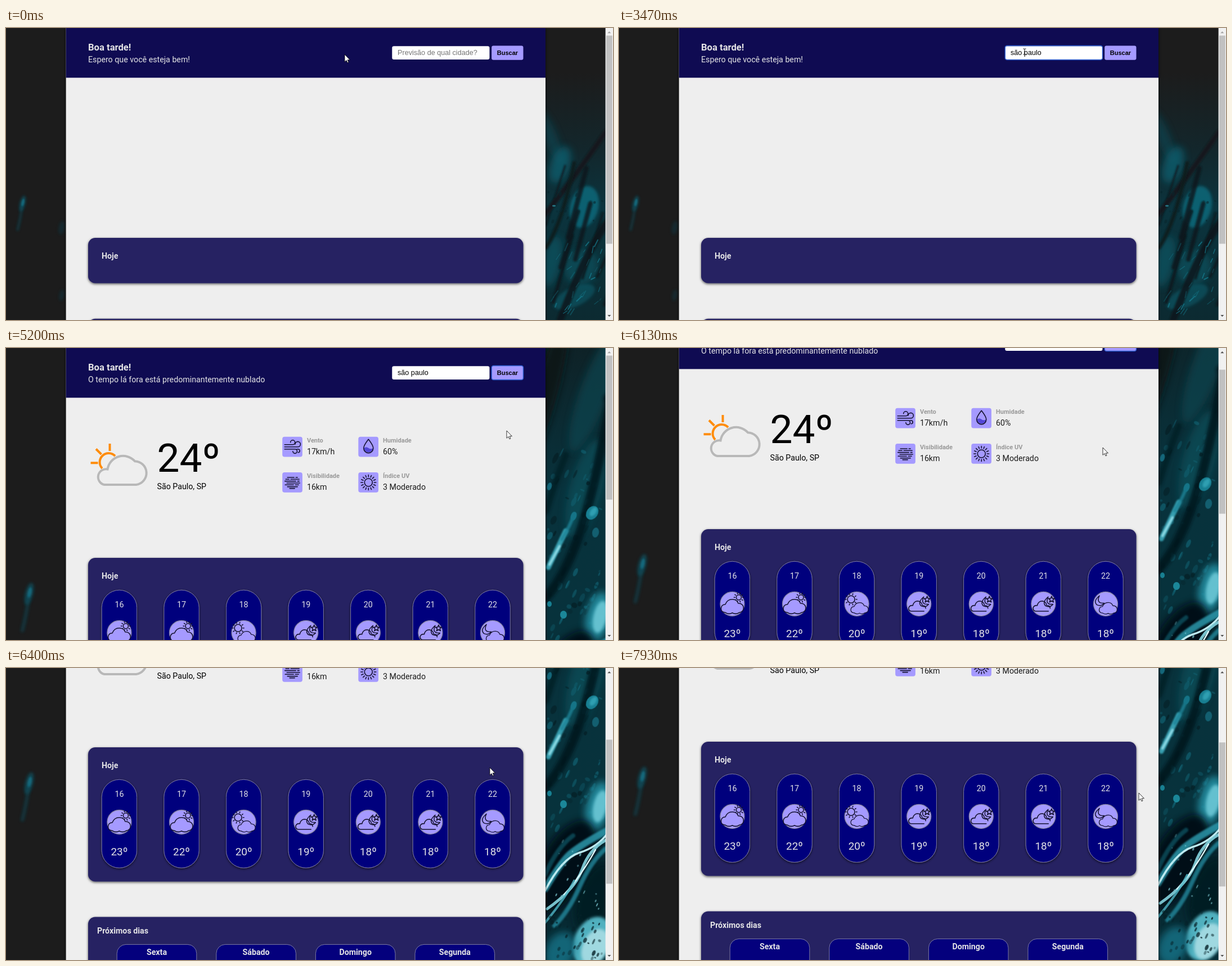
Animation of 1079x519 px, one loop 8000 ms. Source, as an HTML page:

```html
<!DOCTYPE html>
<html lang="pt-BR">
<head>
<meta charset="utf-8">
<title>Previsão do tempo</title>
<style>
html, body { margin: 0; width: 100%; height: 100%; overflow: hidden; background: #1c1c1c; }
svg { display: block; }
text { font-family: Roboto, sans-serif; font-size: 14.22px; white-space: pre; }
.b { font-weight: 700; }
.m { text-anchor: middle; }
.w { fill: #e4e4e6; }
.ui { font-family: "Liberation Sans", Arial, sans-serif; font-size: 12.64px; }
.cap { font-size: 11.06px; font-weight: 700; fill: #999; }
.ink { fill: none; stroke: #14122e; stroke-width: 1.6; stroke-linecap: round; stroke-linejoin: round; }
.card { fill: #252262; filter: url(#shade); }
.pill { fill: #04007d; stroke: #9694b4; stroke-width: .8; }
</style>
</head>
<body>
<svg id="stage" width="1079" height="519" viewBox="0 0 1079 519"></svg>
<script>
const STEP = 1000 / 15, LOOP = 8000;
const LILAC = '#a59aff';

let seed = 11;
const rnd = (a, b) => {
  seed = (seed * 16807) % 2147483647;
  return a + (b - a) * seed / 2147483647;
};
const times = (n, f) => Array.from({ length: n }, (_, i) => f(i)).join('');
const text = (x, y, s, cls = '', extra = '') => `<text x="${x}" y="${y}" class="${cls}" ${extra}>${s}</text>`;
const rect = (x, y, w, h, r, extra) => `<rect x="${x}" y="${y}" width="${w}" height="${h}" rx="${r}" ${extra}/>`;
const path = (d, extra = '') => `<path d="${d}" ${extra}/>`;
const at = (x, y, s, k = 1) => `<g transform="translate(${x} ${y}) scale(${k})">${s}</g>`;
const blob = (x, y, rx, ry, rot, fill, op = 1, blur = 1) =>
  `<ellipse rx="${rx}" ry="${ry}" transform="translate(${x} ${y}) rotate(${rot})" fill="${fill}" opacity="${op}" filter="url(#blur${blur})"/>`;
const line = (d, color, w, op = 1, blur = 1) =>
  path(d, `fill="none" stroke="${color}" stroke-width="${w}" stroke-linecap="round" opacity="${op}" filter="url(#blur${blur})"`);
const rays = (n, r1, r2) => times(n, i => {
  const a = i * 2 * Math.PI / n, c = Math.cos(a), s = Math.sin(a);
  return `M${c * r1} ${s * r1}L${c * r2} ${s * r2}`;
});

// Backdrop: soft tones of a dark teal photo
const feather = blob(41, 437, 7, 20, 14, '#0b5364', .7, 4) + blob(42, 435, 3.5, 10, 12, '#177287', .8, 2) +
  line('M40 445Q36 475 29 502', '#0b4654', 6, .6, 4);
const scatter = (n, y1, y2, size, color, op) => times(n, () =>
  blob(rnd(962, 1064), rnd(y1, y2), rnd(1, size), rnd(1, size * 1.8), 25, color, rnd(op / 3, op), 1));

const photoEmpty = at(0, 0, feather, .714) +
  blob(99, 355, 5, 12, 10, '#0a3944', .5, 4) + blob(99, 475, 4, 10, 10, '#0a3944', .5, 4) +
  '<g clip-path="url(#strip)">' +
  rect(959, 80, 107, 439, 0, 'fill="url(#emptyTone)"') +
  blob(968, 195, 12, 50, -22, '#0a4653', .65, 9) +
  blob(985, 243, 17, 34, 20, '#0c6071', .75, 9) +
  blob(1028, 318, 25, 38, 15, '#0d6c7e', .8, 4) +
  blob(970, 415, 17, 46, 12, '#0a5361', .75, 9) +
  blob(1022, 425, 30, 32, 30, '#0a5562', .65, 9) +
  blob(1010, 478, 40, 17, -25, '#0b5b6a', .6, 4) +
  times(9, i => line(`M${960 + i * 13} ${rnd(350, 510)}l${rnd(25, 45)} -${rnd(85, 150)}`, '#0c181b', rnd(3, 10), .8, 2)) +
  line('M955 335Q1000 280 1066 185', '#14191b', 9, .9, 2) +
  line('M960 390Q990 345 1010 240', '#101b1e', 7, .9, 2) +
  line('M1066 350Q1030 400 985 519', '#0f191b', 13, .85, 2) +
  scatter(22, 290, 345, 2.4, '#08272e', .9) +
  times(34, () => {
    const x = rnd(962, 1062), y = rnd(385, 512);
    return line(`M${x} ${y}l${rnd(2, 9)} -${rnd(3, 13)}`, '#157b8d', rnd(.8, 2.3), rnd(.3, .8));
  }) +
  blob(974, 316, 3, 1.5, 0, '#2a8c9e', .8) + '</g>';

const photoFull = feather + '<g clip-path="url(#strip)">' +
  rect(959, 0, 107, 1000, 0, 'fill="url(#fullTone)"') +
  blob(1045, 80, 25, 110, 20, '#0b4550', .7, 9) +
  blob(960, 80, 20, 130, 15, '#0d1619', .9, 9) +
  blob(1030, 250, 28, 90, 15, '#0b5461', .6, 9) +
  scatter(50, 180, 520, 5, '#147184', .55) +
  scatter(26, 150, 560, 6, '#04171c', .6) +
  line('M958 445Q1010 390 1045 240T1070 90', '#04181d', 17, .85, 4) +
  line('M960 290Q975 240 995 190', '#051a20', 12, .7, 4) +
  line('M964 390Q976 365 995 325', '#43b9cc', 9, .8, 2) +
  line('M966 385L984 352', '#9de4ee', 4, .9, 2) +
  line('M988 340Q1002 318 1010 295', '#1a8296', 6, .8, 2) +
  blob(1042, 293, 10, 13, 35, '#187f92', 1, 1) + blob(1044, 291, 5, 9, 35, '#34a7ba', .8, 2) +
  blob(1009, 299, 5, 8, 20, '#157487') + blob(1048, 328, 6, 9, 10, '#135f70') +
  blob(966, 246, 4, 7, 15, '#14677a') + blob(991, 474, 6, 7, 0, '#1b8799') + blob(966, 455, 4, 5, 0, '#178092') +
  blob(1052, 478, 21, 45, 12, '#2596aa', .85, 9) + blob(1056, 478, 12, 29, 12, '#6fcbd9', .85, 4) +
  blob(992, 585, 42, 90, 28, '#031117', .95, 9) +
  blob(1048, 640, 32, 65, 20, '#041a20', .9, 9) +
  line('M958 625Q985 580 1000 565T1070 520', '#2d9fb3', 12, .8, 2) +
  line('M958 628Q988 570 1020 560T1070 525', '#bdeaf0', 3.5) +
  line('M1066 538Q1036 555 1024 590T962 660', '#85d4df', 5, .9) +
  line('M1066 553Q1040 575 1020 620T975 690', '#20879b', 8, .8, 2) +
  line('M1048 555Q1020 605 992 635', '#e0f8fa', 2.5) +
  line('M958 685Q995 640 1010 610', '#4fb5c5', 4, .8) +
  line('M958 600Q980 550 1008 530', '#0d5968', 8, .7, 2) +
  blob(1042, 718, 32, 46, 25, '#55b8c7', .95, 4) + blob(1047, 728, 22, 34, 25, '#addfe6', .85, 4) +
  blob(985, 735, 25, 35, 25, '#167388', .8, 9) +
  scatter(45, 665, 775, 3, '#062128', .95) +
  scatter(18, 540, 660, 2, '#8bdae4', .8) + '</g>';

// Icons
const wind = path('M4 14H18.5a4 4 0 1 0-4-4M4 18H27.5a4.7 4.7 0 1 0-4.7-4.7M4 22H22.5a3.8 3.8 0 1 1-3.8 3.8M26 22h2a3 3 0 0 1 0 6');
const drop = path('M10 20Q14 17 18 20T26.5 20A8.5 8.5 0 0 1 9.6 20Z', 'fill="#5347d6" stroke="none"') +
  path('M18 4.5C22 10 26.5 15 26.5 20.3a8.5 8.5 0 0 1-17 0C9.5 15 14 10 18 4.5Z');
const haze = path('M9 9H21M24 9h3M6 12.3H12M15 12.3H30M4.500 15.600H24M27 15.600h3M8 19H31M5 22.300H20M23 22.300h6M9 25.600H27M13 28.600H22');
const uv = '<circle cx="18" cy="18" r="7"/>' + at(18, 18, path(rays(16, 10, 13.5)));

const puff = path('M-12 15.500Q-20 15-20 8Q-19 1-12.500 1Q-9-8 0-8Q8-8 10.500-1Q19-1 20 7Q20 14.500 12 15.500Q6 19.500 0 16Q-6 19.500-12 15.500Z', `fill="${LILAC}"`);
const flat = path('M-14 13H9M-14 13Q-19 12-18 6.500Q-16 2-11 3Q-9-5-2-5Q5-4 6 3Q12 3 12 8');
const sun = r => `<circle r="${r}"/>` + path(rays(10, r + 2.2, r + 4));
const moon = path('M-1-9Q-8 6 8 5Q2 12-6 8Q-13 1-1-9Z');
const star = path('M0-5.500L1.500-1.700 5.500-1.500 2.300 1 3.500 5 0 2.700-3.500 5-2.300 1-5.500-1.500-1.500-1.700Z');
const sky = {
  cloud: at(11.5, -11.5, sun(4.5)) + puff,
  sunny: at(-10, -8, sun(6.5)) + at(5, 4, puff, .78),
  night: at(9.5, -4, moon, .95) + flat + at(14.5, -8, star),
  moon: at(-10, -6, moon, .95) + at(4.5, 4, puff, .8),
};

// Page parts
const tile = (x, y, icon, label, value) =>
  rect(x, y, 35.7, 35.7, 4, `fill="${LILAC}"`) + `<g class="ink">${at(x, y, icon)}</g>` +
  text(x + 43.7, y + 10.2, label, 'cap') + text(x + 43.7, y + 31, value, '', 'fill="#1c1c1c"');

const pill = (i, kind, temp) => {
  const x = 201.4 + i * 110.6;
  return rect(x - 31.2, 430.3, 62.4, 157, 31.2, 'class="pill" filter="url(#shade)"') +
    text(x, 461.3, 16 + i, 'm w') +
    `<circle cx="${x}" cy="505.800" r="21.500" fill="${LILAC}" stroke="#87859d" stroke-width="1.300"/>` +
    `<g class="ink">${at(x, 505.8, sky[kind])}</g>` +
    text(x, 564.8, temp + 'º', 'm w', 'style="font-size:18.960px"');
};

const card = (y, h) => rect(146, y, 773.5, h, 12.6, 'class="card"');
const kinds = ['cloud', 'cloud', 'sunny', 'night', 'night', 'night', 'moon'];
const temps = [23, 22, 20, 19, 18, 18, 18];
const days = ['Sexta', 'Sábado', 'Domingo', 'Segunda'];

const weather =
  path('M171 214A15.500 15.500 0 0 1 194 192M184.500 170V183M160 179.500L169.500 189M150.500 204.300H163.500',
    'fill="none" stroke="#ff8c0a" stroke-width="4"') +
  path('M175 243H231.500A21 21 0 0 0 229 201.200A28 28 0 0 0 180.500 215.500A14 14 0 0 0 175 243Z',
    'fill="#eee" stroke="#b8b8b8" stroke-width="4"') +
  text(268.5, 220, '24º', '', 'style="font-size:71.100px"') +
  text(268.5, 251.2, 'São Paulo, SP') +
  tile(491.2, 157.8, wind, 'Vento', '17km/h') + tile(626.3, 157.8, drop, 'Humidade', '60%') +
  tile(491.2, 221, haze, 'Visibilidade', '16km') + tile(626.3, 221, uv, 'Índice UV', '3 Moderado') +
  card(373, 238.5) + times(7, i => pill(i, kinds[i], temps[i])) +
  card(674.5, 240) + text(162, 704, 'Próximos dias', 'b w') +
  times(4, i => rect(197.2 + i * 176.6, 723.4, 141.6, 160, 16, 'class="pill"') +
    text(268 + i * 176.6, 742, days[i], 'b m w'));

const ring = (id, x, w) => rect(x, 31.6, w, 25, 3.5, `id="${id}" fill="none" stroke="#2f5fd0" stroke-width="1.500"`);
const blur = n => `<filter id="blur${n}" x="-100%" y="-100%" width="300%" height="300%"><feGaussianBlur stdDeviation="${n * .7}"/></filter>`;
const tone = (id, stops) => `<linearGradient id="${id}" x2="0" y2="1">` +
  stops.map(([o, c]) => `<stop offset="${o}" stop-color="${c}"/>`).join('') + '</linearGradient>';

const $ = id => document.getElementById(id);
$('stage').innerHTML = `<defs>${[1, 2, 4, 9].map(blur).join('')}
  <filter id="shade" x="-10%" y="-10%" width="120%" height="125%"><feDropShadow dx="0" dy="1.600" stdDeviation="2" flood-opacity=".65"/></filter>
  <clipPath id="strip"><rect x="959" y="0" width="107" height="1000"/></clipPath>
  ${tone('emptyTone', [[0, '#1c1c1c'], [.3, '#13262b'], [.55, '#0b343e'], [1, '#0c2a31']])}
  ${tone('fullTone', [[0, '#0e2227'], [.25, '#08323c'], [.5, '#07323c'], [.6, '#06232b'], [1, '#0a4450']])}</defs>
  <rect width="1079" height="519" fill="#1c1c1c"/>
  <g id="page">
    <g id="photoEmpty">${photoEmpty}</g><g id="photoFull">${photoFull}</g>
    <rect x="106.600" width="852.400" height="1000" fill="#000" opacity=".7" filter="url(#blur4)"/>
    <rect x="106.600" width="852.400" height="1000" fill="#eee"/>
    <rect x="106.600" width="852.400" height="88.400" fill="#0f0b52"/>
    ${text(146, 39.6, 'Boa tarde!', 'b w', 'style="font-size:16.630px"')}
    ${text(146, 61, '', 'w', 'id="note"')}
    ${rect(686.3, 32.2, 173.2, 23.8, 3.2, 'fill="#fff"')}${ring('ringField', 686.3, 173.2)}
    ${text(696, 48.2, '', 'ui', 'id="field"')}
    ${rect(863.2, 31.6, 56.3, 25.2, 3.2, `fill="${LILAC}"`)}${ring('ringButton', 863.2, 56.3)}
    ${text(891.4, 48.2, 'Buscar', 'ui b m', 'style="font-size:11.060px"')}
    <g id="empty">${card(373, 80.5)}${card(516.8, 80.5)}</g>
    <g id="weather">${weather}</g>
    ${text(170, 410, 'Hoje', 'b w')}
  </g>
  <rect x="1065.600" width="13.400" height="519" fill="#f1f1f1"/>
  <rect id="thumb" x="1067" width="10.800" fill="#c1c1c1"/>
  <path id="up" d="M1069.300 9.300h6l-3-3.300Z"/><path d="M1069.300 510h6l-3 3.300Z" fill="#505050"/>
  <path id="arrow" d="M0 0V13.300L3.100 10.500 5 14.800 7 14 5.200 9.800H9.400Z" fill="#fff" stroke="#000" stroke-width=".8"/>
  <path id="beam" d="M-2.500-5H-.7L0-4.300.7-5H2.500M0-4.300V4.300M-2.500 5H-.7L0 4.300.7 5H2.500" fill="none" stroke="#111" stroke-width="1"/>`;

// Ticks of 1/15 s
const moves = [
  [0, 602, 47], [2, 605, 47], [3, 605, 47], [8, 668, 46], [13, 721, 42], [51, 721, 42], [52, 721, 42],
  [55, 870, 52], [57, 931, 73], [60, 897, 47], [68, 897, 47], [72, 905, 90], [78, 890, 147],
  [81, 881, 160], [83, 860, 177], [108, 860, 177], [114, 924, 222], [120, 924, 222],
];
const typed = [[25, 1], [29, 2], [32, 3], [35, 5], [36, 6], [38, 7], [41, 8], [44, 9]];
const scrolls = [0, 6, 24, 51, 103, 165, 207, 232, 237];
const CLICK_FIELD = 15, CLICK_BUTTON = 65, LOADED = 72, WHEEL = 89, WHEEL_AGAIN = 119;

const pointer = k => {
  const i = Math.max(1, moves.findIndex(m => m[0] >= k));
  const [a, x1, y1] = moves[i - 1], [b, x2, y2] = moves[i], u = (k - a) / (b - a);
  return [x1 + (x2 - x1) * u, y1 + (y2 - y1) * u];
};
const show = (id, on) => { $(id).style.display = on ? '' : 'none'; };

function draw(k) {
  const full = k >= LOADED;
  const scroll = k >= WHEEL_AGAIN ? 242 : scrolls[Math.min(8, Math.max(0, k - WHEEL))];
  const count = typed.reduce((n, [tick, len]) => k >= tick ? len : n, 0);
  const [x, y] = pointer(k);
  const inField = !full && x > 686 && x < 860 && y > 32 && y < 56;

  $('page').setAttribute('transform', `translate(0 ${-scroll})`);
  $('note').textContent = full ? 'O tempo lá fora está predominantemente nublado' : 'Espero que você esteja bem!';
  $('field').textContent = count ? 'são paulo'.slice(0, count) : 'Previsão de qual cidade?';
  $('field').setAttribute('fill', count ? '#000' : '#757575');
  show('photoEmpty', !full);
  show('photoFull', full);
  show('empty', !full);
  show('weather', full);
  show('ringField', k >= CLICK_FIELD && k < CLICK_BUTTON);
  show('ringButton', k >= CLICK_BUTTON);
  $('thumb').setAttribute('y', 13.5 + scroll * .491);
  $('thumb').setAttribute('height', full ? 256 : 370);
  $('up').setAttribute('fill', scroll ? '#505050' : '#a3a3a3');
  show('arrow', !inField);
  show('beam', inField);
  for (const id of ['arrow', 'beam']) $(id).setAttribute('transform', `translate(${x} ${y})`);
}

let last = -1;
const start = performance.now();
function loop() {
  const k = Math.floor(((performance.now() - start) % LOOP + 5) / STEP) % 120;
  if (k !== last) draw(last = k);
  requestAnimationFrame(loop);
}
loop();
</script>
</body>
</html>
```
